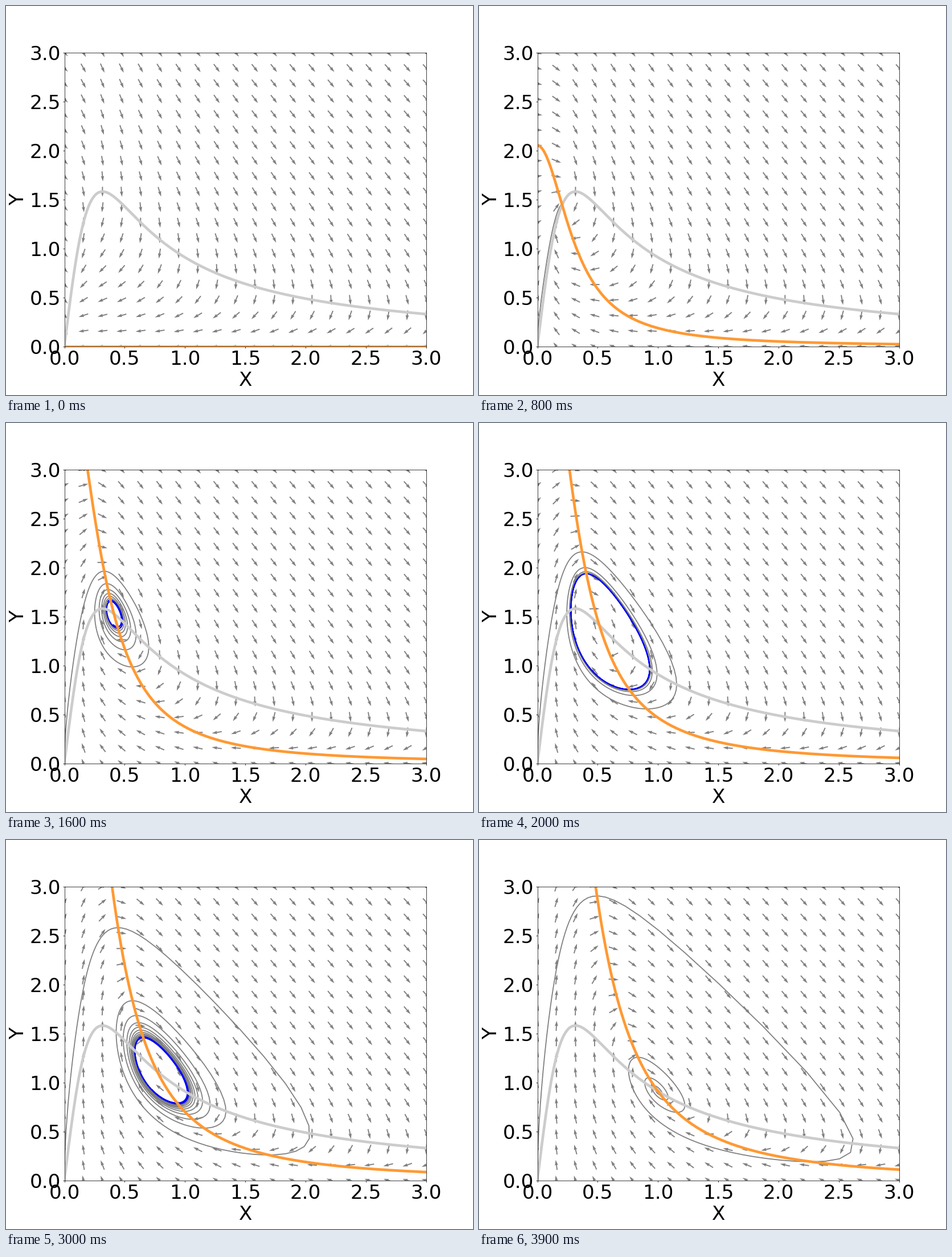
A matplotlib script that plays this animation: 820 by 683 pixels, repeating every 4 s.

```python
import numpy as np
import matplotlib.pyplot as plt
from matplotlib.animation import FuncAnimation

# Phase portrait of a two-variable oscillator:
#   x' = -x + a*y + x^2*y,   y' = b - a*y - x^2*y,   with b swept from 0 to 1
FRAMES = 40
A = 0.1
B = np.linspace(0, 1, FRAMES)
LIMIT = 3
T_END, SAMPLES, SUBSTEPS = 100, 1000, 5
TAIL = 200
DPI = 64


def px(size):
    """Convert pixels to points."""
    return size * 72 / DPI


def field(x, y, b):
    flow = (A + x**2) * y
    return flow - x, b - flow


def integrate():
    """Runge-Kutta paths from the origin, for all values of b at once."""
    dt = T_END / (SAMPLES * SUBSTEPS)

    def rate(s):
        return np.array(field(s[0], s[1], B))

    state = np.zeros((2, FRAMES))
    path = [state]
    for _ in range(SAMPLES):
        for _ in range(SUBSTEPS):
            k1 = rate(state)
            k2 = rate(state + dt / 2 * k1)
            k3 = rate(state + dt / 2 * k2)
            k4 = rate(state + dt * k3)
            state = state + dt / 6 * (k1 + 2 * k2 + 2 * k3 + k4)
        path.append(state)
    return np.array(path)


def arrows(b):
    u, v = field(gx, gy, b)
    norm = np.hypot(u, v)
    norm[norm == 0] = 1
    return u / norm, v / norm


plt.rcParams["font.family"] = "DejaVu Sans"
fig, ax = plt.subplots(figsize=(820 / DPI, 683 / DPI), dpi=DPI)
fig.subplots_adjust(left=0.125, right=0.9, bottom=0.125, top=0.88)
ax.set_xlim(0, LIMIT)
ax.set_ylim(0, LIMIT)
ticks = np.arange(0, LIMIT + 0.1, 0.5)
ax.set_xticks(ticks)
ax.set_yticks(ticks)
ax.tick_params(labelsize=px(34.2), length=px(3.3), width=px(0.76), pad=px(3.3))
ax.set_xlabel("X", fontsize=px(34.2), labelpad=px(3.8))
ax.set_ylabel("Y", fontsize=px(34.2), labelpad=px(3.8))
for spine in ax.spines.values():
    spine.set_linewidth(px(0.76))

grid = np.linspace(0, LIMIT, 20)
gx, gy = np.meshgrid(grid, grid)
quiver = ax.quiver(gx, gy, *arrows(0), color="gray", pivot="mid",
                   scale=36, width=0.003)

paths = integrate()
xs = np.linspace(0, LIMIT, 500)
trail, = ax.plot([], [], color="gray", lw=px(1.8))
cycle, = ax.plot([], [], color="blue", lw=px(2))
ax.plot(xs, xs / (A + xs**2), color="#cccccc", lw=px(4.7))
y_null, = ax.plot([], [], color="#ff9933", lw=px(4.7))


def update(i):
    quiver.set_UVC(*arrows(B[i]))
    x, y = paths[:, 0, i], paths[:, 1, i]
    trail.set_data(x, y)
    cycle.set_data(x[-TAIL:], y[-TAIL:])
    y_null.set_data(xs, B[i] / (A + xs**2))
    return quiver, trail, cycle, y_null


anim = FuncAnimation(fig, update, frames=FRAMES, interval=100,
                     repeat=True, repeat_delay=0, blit=False)
plt.show()
```
